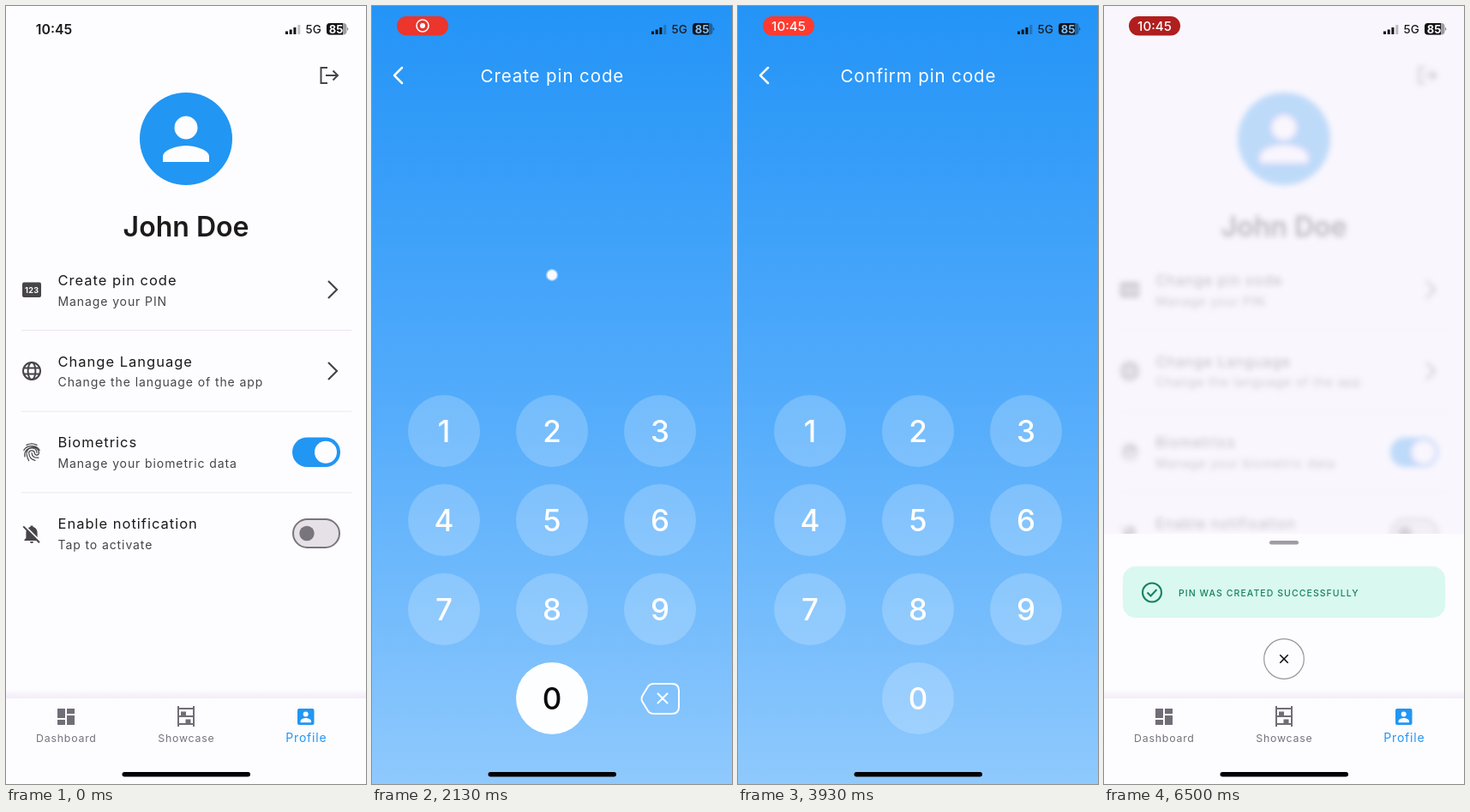
Recreate the animation shown at these times as an HTML page. Size 420 px wide and 908 px high, loop 6530 ms.

```html
<!DOCTYPE html>
<html lang="en">
<head>
<meta charset="utf-8">
<title>Pin code flow</title>
<style>
  html, body { margin: 0; width: 100%; height: 100%; overflow: hidden; background: #fdfcff; }
  svg { display: block; width: 100vw; height: 100vh; --ink: #1c1b1a; --dim: #47444a; --accent: #2196f3; }
  text { font-family: Inter, "Open Sans", sans-serif; fill: var(--ink); }
  .mid { text-anchor: middle; }
  .line { fill: none; stroke: var(--dim); stroke-width: 2; }
  .white { fill: none; stroke: #fff; stroke-linecap: round; stroke-linejoin: round; }
  .title { font-size: 16.5px; letter-spacing: 1px; }
  .sub { font-size: 14px; letter-spacing: .9px; fill: var(--dim); }
  .tab { font-size: 12.3px; letter-spacing: .8px; fill: #77737c; }
  .head { font-size: 20.5px; letter-spacing: .9px; fill: #fff; }
  .digit { font-size: 35px; font-weight: 500; fill: #fff; }
</style>
</head>
<body>
<svg viewBox="0 0 420 908">
  <defs>
    <linearGradient id="sky" x2="0" y2="1">
      <stop stop-color="#2394f7"/>
      <stop offset=".5" stop-color="#52abfb"/>
      <stop offset="1" stop-color="#8fc9fd"/>
    </linearGradient>
    <linearGradient id="edge" x2="0" y2="1">
      <stop stop-color="#f2ecf7" stop-opacity="0"/>
      <stop offset="1" stop-color="#f2ecf7"/>
    </linearGradient>
    <filter id="blur" filterUnits="userSpaceOnUse" x="-20" y="0" width="460" height="830">
      <feGaussianBlur id="blurAmount" stdDeviation="0"/>
    </filter>
    <clipPath id="body"><rect y="0" width="422" height="808"/></clipPath>
  </defs>

  <g id="profile">
    <rect width="422" height="908" fill="#fdfcff"/>
    <g clip-path="url(#body)">
      <g id="content">
        <rect id="pressed" y="293" width="420" height="77" fill="#eae6ec"/>
        <path class="line" d="M375 72H367.5V90H375M373 81H386M381.5 75.5 387 81 381.5 86.5"/>
        <circle cx="210" cy="155" r="54" fill="var(--accent)"/>
        <circle cx="210" cy="142" r="13.5" fill="#fdfcff"/>
        <path d="M183 182V176C183 167 201 163 210 163S237 167 237 176V182Z" fill="#fdfcff"/>
        <text class="mid" x="210" y="269" font-size="32" font-weight="600">John Doe</text>
        <g id="rows"></g>

        <rect x="19" y="322.5" width="22" height="17.5" rx="2" fill="var(--dim)"/>
        <text class="mid" x="30.3" y="334.5" font-size="9" font-weight="700" letter-spacing=".4" style="fill:#fff">123</text>
        <g class="line" transform="translate(30 426)">
          <circle r="10"/><ellipse rx="4.4" ry="10"/><path d="M-9.4-3.6H9.4M-9.4 3.6H9.4"/>
        </g>
        <g class="line" style="stroke-width:1.2" stroke-linecap="round" transform="translate(30 521)">
          <path d="M-6-8.6Q0-11.6 6-8.6M-9.2-2.5C-6-9 6-9 9.2-2.5M-8 5C-10-8 8-9 8.4 0C8.5 4 3.4 4 3.3.5C3-3-3.4-3-3.3 1C-3 6 0 8.5 4 9.4M-3.4 9.6C-9-1-4-5 0-5C4-5 6-3 6 .3M0 .5C0 5 4 6.8 8 6"/>
        </g>
        <g transform="translate(30 616)">
          <path d="M-6.6 5V-1C-6.6-5-4.5-7.4-1.5-8V-9.5H1.5V-8C4.5-7.4 6.6-5 6.6-1V5L8.6 7V8H-8.6V7ZM-2 9H2Q2 11 0 11T-2 9Z" fill="var(--dim)"/>
          <path d="M-8.5-9.8 10 8.7" stroke="#fdfcff" stroke-width="2"/>
          <path d="M-9.8-8.6 9 10.2" class="line"/>
        </g>
        <path class="line" style="stroke-width:2.2" d="M376 321 386 331 376 341M376 416 386 426 376 436"/>
        <rect x="334" y="503.5" width="56" height="34.5" rx="17.2" fill="var(--accent)"/>
        <circle cx="373" cy="520.8" r="13" fill="#fdfcff"/>
        <rect x="335" y="599" width="54" height="33" rx="16.5" fill="#e6e1e6" stroke="#79757c" stroke-width="2"/>
        <circle cx="351" cy="615.5" r="8.7" fill="#79757c"/>
      </g>
      <rect id="haze" width="422" height="808" fill="#f8f5fd"/>
      <g id="sheet">
        <rect y="616" width="422" height="193" fill="#fdfcff"/>
        <rect x="193" y="624" width="34" height="4.5" rx="2.2" fill="#a09ca3"/>
        <rect x="22" y="654" width="376" height="60" rx="15" fill="#d9f8f0"/>
        <g fill="none" stroke="#16825a" stroke-width="2">
          <circle cx="56" cy="684.5" r="11"/><path d="M50.5 684.5 54.5 688.5 61.5 681"/>
        </g>
        <text x="87" y="688.6" font-size="10.5" font-weight="500" letter-spacing="1.07" style="fill:#16825a">PIN WAS CREATED SUCCESSFULLY</text>
        <circle cx="210" cy="762" r="23.3" fill="#fdfcff" stroke="#98949c" stroke-width="1.2"/>
        <path d="M205.3 757.3 214.7 766.7M214.7 757.3 205.3 766.7" stroke="#151417" stroke-width="1.6"/>
      </g>
    </g>
    <rect x="0" y="798" width="422" height="10" fill="url(#edge)"/>
    <g fill="#716d76">
      <path d="M60 820h9v11h-9zM60 833h9v6h-9zM71 820h9v6h-9zM71 828h9v11h-9z"/>
      <path d="M200 817h2v24h-2zM218 817h2v24h-2zM201 819h18v2h-18zM201 828h18v2h-18zM201 837h18v2h-18zM204 823.5h6v5h-6zM209.5 832.5h6v5h-6z"/>
    </g>
    <rect x="340" y="820" width="19.5" height="19" rx="2" fill="#2196f3"/>
    <circle cx="349.7" cy="826.5" r="3" fill="#fdfcff"/>
    <path d="M343.5 836.3V835C343.5 832 347.5 831 349.7 831S356 832 356 835V836.3Z" fill="#fdfcff"/>
    <text class="tab mid" x="70.4" y="859">Dashboard</text>
    <text class="tab mid" x="210.4" y="859">Showcase</text>
    <text class="mid" x="350.4" y="858.5" font-size="14" letter-spacing=".8" style="fill:#2196f3">Profile</text>
  </g>

  <g id="pin">
    <rect width="420" height="908" fill="url(#sky)"/>
    <path class="white" stroke-width="2.5" d="M35 72 26 81 35 90"/>
    <text id="heading" class="head mid" x="210.4" y="89"></text>
    <g id="dots"></g>
    <g id="keys"></g>
    <path id="erase" class="white" stroke-width="2" d="M328 791H350Q358 791 358 799V818Q358 826 350 826H328Q325 826 322.5 823.5L315.5 812Q313.5 808.5 315.5 805L322.5 793.5Q325 791 328 791M333.5 802.5 344.5 813.5M344.5 802.5 333.5 813.5"/>
  </g>

  <g fill="#131314">
    <path d="M326 29.5h3v3.5h-3zM330.7 27.5h3v5.5h-3zM335.4 25h3v8h-3z"/>
    <path d="M340.3 22h3v11h-3z" opacity=".25"/>
    <text x="349.5" y="32" font-size="13.5" font-weight="500">5G</text>
    <rect x="374" y="20" width="23.5" height="13.5" rx="4" opacity=".4"/>
    <path d="M378 20H393V33.5H378Q374 33.5 374 29.5V24Q374 20 378 20ZM398.5 24.5Q400 26.8 398.5 29Z"/>
    <text id="charge" class="mid" x="385" y="31.5" font-size="13" font-weight="700">85</text>
    <rect x="135.5" y="894" width="149.5" height="5.5" rx="2.7" fill="#030303"/>
  </g>
  <text id="clock" class="mid" x="56" y="32.5" font-size="15.8" font-weight="600">10:45</text>
  <g id="pill">
    <rect id="pillFill" x="29" y="12" width="60" height="22.5" rx="11.2"/>
    <g id="record">
      <circle cx="59" cy="23" r="7" fill="none" stroke="#fff" stroke-width="1.6"/>
      <circle cx="59" cy="23" r="3" fill="#fff"/>
    </g>
    <text id="pillTime" class="mid" x="59" y="28.5" font-size="15.2" font-weight="500" style="fill:#fff">10:45</text>
  </g>
</svg>
<script>
const LOOP = 6530, SLIDE = 230;
const PUSH = 1387, POP = 4762, CONFIRM = 3000, SUBMIT = 4740, SHEET = 4820;
const FIRST_TAPS = [2130, 2430, 2700], SECOND_TAPS = [4080, 4350, 4660];
const TAPS = [...FIRST_TAPS, ...SECOND_TAPS];

const $ = id => document.getElementById(id);
const clamp = v => Math.min(1, Math.max(0, v));
const ramp = (t, start, length) => clamp((t - start) / length);
const blend = (a, b, k) => a.map((v, i) => v + (b[i] - v) * k);
const rgb = color => `rgb(${color.map(Math.round)})`;
const set = (id, attrs) => { for (const k in attrs) $(id).setAttribute(k, attrs[k]); };
const show = (id, on) => set(id, { opacity: +on });

const bezier = (a, b, s) => 3 * s * (1 - s) ** 2 * a + 3 * s * s * (1 - s) * b + s ** 3;
function slideEase(x) {
  let lo = 0, hi = 1;
  for (let i = 0; i < 24; i++) {
    const s = (lo + hi) / 2;
    if (bezier(.35, .33, s) < x) lo = s; else hi = s;
  }
  return bezier(.91, .97, lo);
}

const ROWS = [
  ['Create pin code', 'Manage your PIN'],
  ['Change Language', 'Change the language of the app'],
  ['Biometrics', 'Manage your biometric data'],
  ['Enable notification', 'Tap to activate']
];
$('rows').innerHTML = ROWS.map(([title, sub], i) => {
  const y = 331 + i * 94.7;
  return `<text class="title" x="60.5" y="${y - 5}">${title}</text>
    <text class="sub" x="60.5" y="${y + 18.5}">${sub}</text>` +
    (i < 3 ? `<path d="M18 ${y + 47.5}H403" stroke="#ebe6ee"/>` : '');
}).join('');
const pinRow = $('rows').querySelector('text');

$('keys').innerHTML = [1, 2, 3, 4, 5, 6, 7, 8, 9, 0].map((digit, i) => {
  const x = digit ? 84 + i % 3 * 126 : 210, y = 496 + Math.floor(i / 3) * 104;
  return `<circle cx="${x}" cy="${y}" r="42" fill="#fff" fill-opacity=".2"/>
    <text class="digit mid" x="${x}" y="${y + 13}">${digit}</text>`;
}).join('');
const zeroKey = $('keys').querySelector('circle:last-of-type');
const zeroText = $('keys').querySelector('text:last-of-type');

function drawDots(taps, t) {
  const entered = taps.filter(tap => t >= tap);
  $('dots').innerHTML = entered.map((tap, i) => {
    const x = 210 + (i - (entered.length - 1) / 2) * 45.3;
    const k = .5 + .5 * ramp(t, tap, 30);
    return `<circle cx="${x}" cy="314" r="${14 * k}" fill="#fff" fill-opacity=".4"/>
      <circle cx="${x}" cy="314" r="${11 * k}" fill="#fafaff"/>`;
  }).join('');
  return entered.length;
}

function drawPin(t) {
  const confirming = t >= CONFIRM;
  $('heading').textContent = confirming ? 'Confirm pin code' : 'Create pin code';
  const count = drawDots(confirming ? SECOND_TAPS : FIRST_TAPS, t);
  show('erase', count > 0 && t < SUBMIT);
  const lastTap = TAPS.filter(tap => t >= tap).pop();
  const glow = lastTap ? 1 - ramp(t, lastTap + 80, 150) : 0;
  zeroKey.setAttribute('fill-opacity', .2 + .78 * glow);
  zeroText.style.fill = glow > .5 ? '#0a0a0a' : '#fff';
}

function drawProfile(t) {
  const open = ramp(t, SHEET, 176);
  const haze = clamp(open * 1.3);
  if (haze) set('content', { filter: 'url(#blur)' });
  else $('content').removeAttribute('filter');
  set('blurAmount', { stdDeviation: 3.2 * haze });
  set('haze', { opacity: .73 * haze });
  set('sheet', { transform: `translate(0 ${193 * (1 - open) ** 3})`, opacity: +(open > 0) });
  pinRow.textContent = t < SUBMIT ? 'Create pin code' : 'Change pin code';
  show('pressed', t >= 1360 && t < 2000);
}

function drawPill(t, onBlue) {
  const appear = ramp(t, 200, 250);
  show('clock', appear < .5);
  set('pill', { opacity: appear });
  const dim = (1 - Math.cos((t - 1530) / 2400 * 2 * Math.PI)) / 2;
  const pulse = blend([255, 59, 48], [215, 48, 42], dim);
  set('pillFill', { fill: rgb(blend(pulse, [176, 30, 30], ramp(t, 5900, 600))) });
  const toTime = ramp(t, 3250, 150);
  set('record', { opacity: 1 - toTime });
  set('pillTime', { opacity: toTime });
  $('charge').style.fill = onBlue ? '#7cbffa' : '#fdfcff';
}

function draw(t) {
  const cover = slideEase(ramp(t, PUSH, SLIDE)) - slideEase(ramp(t, POP, SLIDE));
  const x = 420 * (1 - cover);
  set('pin', { transform: `translate(${x} 0)` });
  set('profile', { transform: `translate(${-135 * cover} 0)` });
  drawProfile(t);
  drawPin(t);
  drawPill(t, x < 380);
}

const began = performance.now();
function tick() {
  draw((performance.now() - began) % LOOP);
  requestAnimationFrame(tick);
}
tick();
</script>
</body>
</html>
```
